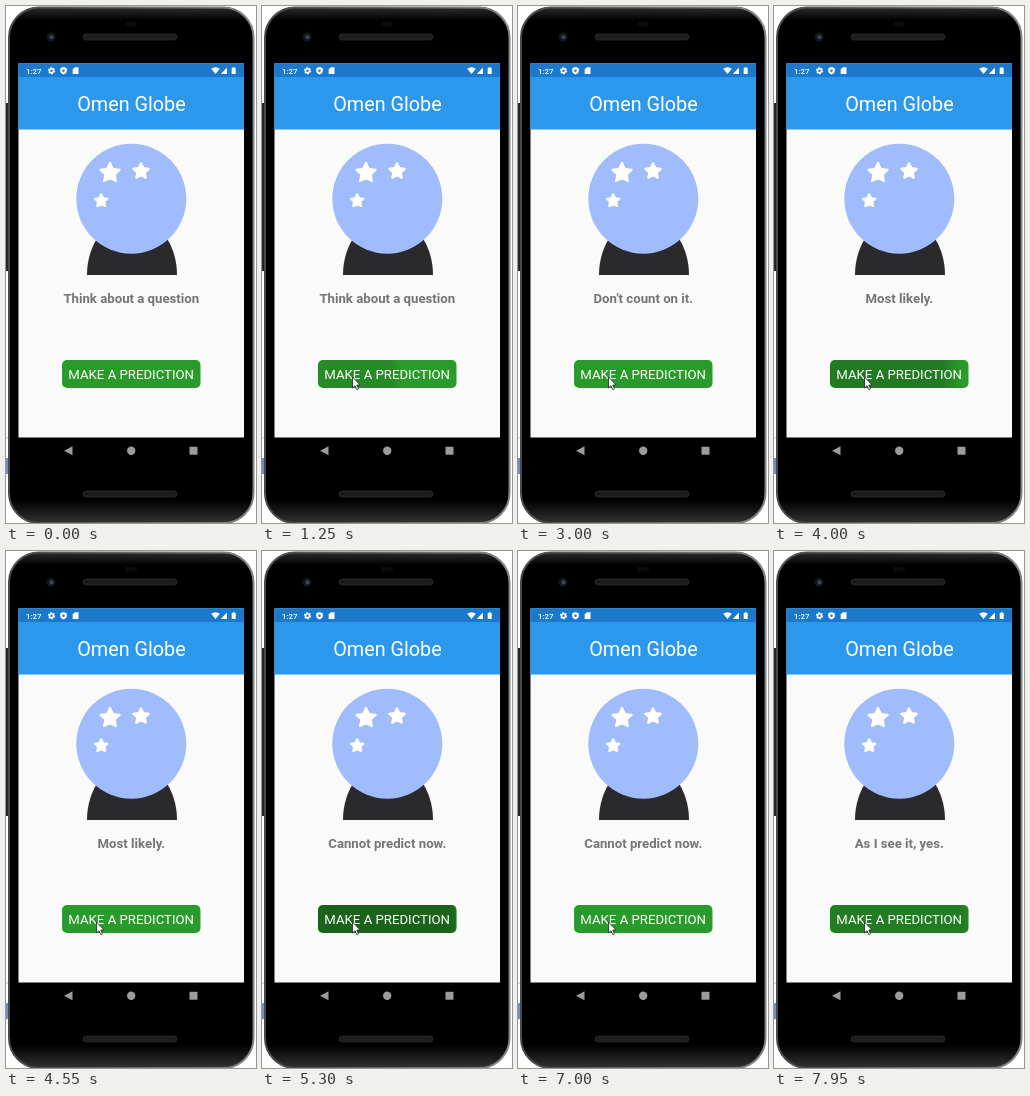
Recreate the animation shown at these times as an HTML page. Size 250 px wide and 517 px high, loop 8000 ms.

```html
<!DOCTYPE html>
<html lang="en">
<head>
<meta charset="utf-8">
<title>Omen Globe</title>
<style>
  html, body { margin: 0; width: 100%; height: 100%; overflow: hidden; background: #fff; }
  svg { display: block; width: 250px; height: 517px; }
  text { font-family: Roboto, sans-serif; text-anchor: middle; fill: #fff; }
</style>
</head>
<body>
<svg viewBox="0 0 250 517">
  <defs>
    <clipPath id="buttonShape"><rect x="56" y="354" width="138.5" height="28" rx="5"/></clipPath>
    <radialGradient id="rippleFill">
      <stop offset=".8" stop-color="#000"/>
      <stop offset="1" stop-color="#000" stop-opacity="0"/>
    </radialGradient>
    <linearGradient id="bodyFill" x2="0" y2="1">
      <stop stop-color="#2c2c2c"/>
      <stop offset=".025" stop-color="#000"/>
      <stop offset=".955" stop-color="#000"/>
      <stop offset="1" stop-color="#333"/>
    </linearGradient>
    <linearGradient id="rimFill">
      <stop stop-color="#4a4a4a"/>
      <stop offset="1" stop-color="#858585"/>
    </linearGradient>
  </defs>

  <!-- desktop behind the phone -->
  <rect width="250" height="517" fill="#fff"/>
  <path d="M0 97H5V265H0Z" fill="#252628"/>
  <path d="M0 432H6" stroke="#bbb"/>
  <path d="M0 452H5V468H0Z" fill="#6d8fc4"/>

  <!-- phone -->
  <rect x="3" y="1.500" width="244.500" height="515.500" rx="30" fill="url(#bodyFill)" stroke="url(#rimFill)" stroke-width="2"/>
  <rect x="119" y="15.500" width="12" height="5" rx="2" fill="#0b0b0b"/>
  <g fill="#1d1d1e" stroke="#303031" stroke-width=".7">
    <rect x="77" y="28" width="94" height="6" rx="3"/>
    <rect x="77" y="485" width="94" height="6" rx="3"/>
  </g>
  <circle cx="45" cy="31" r="4.500" fill="#15161a"/>
  <circle cx="45.500" cy="31.300" r="2" fill="#39476b"/>

  <!-- screen -->
  <rect x="12.500" y="58" width="225.500" height="400" fill="#000"/>
  <rect x="12.500" y="57.500" width="225.500" height="374" fill="#fafafa"/>
  <rect x="12.500" y="57.500" width="225.500" height="66" fill="#2b98ed"/>
  <rect x="12.500" y="57.500" width="225.500" height="13.500" fill="#1c78cd"/>

  <g fill="#fff">
    <text x="27.800" y="67.500" font-size="7.900" font-weight="500">1:27</text>
    <circle cx="45.500" cy="64.700" r="2" fill="none" stroke="#fff" stroke-width="1.600"/>
    <circle cx="45.500" cy="64.700" r="3" fill="none" stroke="#fff" stroke-width="1.200" stroke-dasharray="1.570"/>
    <path d="M57.500 61l3.300 1.300v2.400q0 2.600-3.300 3.700-3.300-1.100-3.300-3.700v-2.400z"/>
    <circle cx="57.500" cy="64.700" r="1.200" fill="#1c78cd"/>
    <path d="M68.800 61.300H72.500V68H66.700V63.400Z"/>
    <path d="M205.200 62.800q4.300-3.200 8.600 0L209.500 68Z"/>
    <path d="M221 61.500V68H214.800Z"/>
    <path d="M225.700 62h1v-.8h2v.8h1v6h-4z"/>
  </g>

  <text x="125.500" y="105" font-size="19.800">Omen Globe</text>

  <!-- globe -->
  <path d="M81 269A45 58 0 0 1 171 269Z" fill="#2a2a2c"/>
  <circle cx="125.300" cy="192.700" r="55" fill="#a1bcfc"/>
  <g id="stars" fill="#fff" stroke="#fff" stroke-width="2.200" stroke-linejoin="round"></g>

  <text id="answer" x="125.300" y="297.300" font-size="13.200" font-weight="700" style="fill:#757575"></text>

  <!-- button -->
  <g clip-path="url(#buttonShape)">
    <rect x="56" y="354" width="139" height="28" fill="#2a9a2a"/>
    <circle id="ripple" cx="92" cy="372" fill="url(#rippleFill)"/>
  </g>
  <text x="125.200" y="373.200" font-size="13.200">MAKE A PREDICTION</text>

  <!-- navigation bar -->
  <g fill="#9b9b9b">
    <path d="M66.500 440.300V449.300L58 444.800Z"/>
    <circle cx="125.200" cy="444.800" r="4.200"/>
    <rect x="183.500" y="440.800" width="8" height="8" rx=".6"/>
  </g>

  <path id="cursor" d="M0 0V11L2.500 8.700 4.200 12.600 6 11.800 4.300 8H7.700Z" fill="#fff" stroke="#222" stroke-width=".8"/>
</svg>

<script>
const LOOP = 8000;
const FIRST_TEXT = "Think about a question";
const presses = [
  [1150, "Outlook not so good."],
  [2270, "Don't count on it."],
  [3800, "Most likely."],
  [4950, "Cannot predict now."],
  [7440, "As I see it, yes."]
];
const TEXT_DELAY = 120, GROW = 250, DARKEN = 350, FADE = 350, DARKNESS = 0.36;

const get = id => document.getElementById(id);
const clamp = v => Math.min(1, Math.max(0, v));
const answer = get("answer"), ripple = get("ripple"), cursor = get("cursor");

function starPath(x, y, r) {
  const points = Array.from({ length: 10 }, (_, i) => {
    const a = i * Math.PI / 5 - Math.PI / 2;
    const d = i % 2 ? r * 0.48 : r;
    return `${(x + d * Math.cos(a)).toFixed(2)} ${(y + d * Math.sin(a)).toFixed(2)}`;
  });
  return `<path d="M${points.join("L")}Z"/>`;
}
get("stars").innerHTML =
  starPath(104, 167, 10) + starPath(135, 165.3, 8) + starPath(95.2, 194.8, 6.5);

function draw(t) {
  const shown = presses.filter(([at]) => t >= at + TEXT_DELAY).pop();
  const text = shown ? shown[1] : FIRST_TEXT;
  if (answer.textContent !== text) answer.textContent = text;

  const pressed = presses.filter(([at]) => t >= at).pop();
  const age = pressed ? t - pressed[0] : Infinity;
  const strength = clamp(age / DARKEN) * (1 - clamp((age - DARKEN) / FADE));
  ripple.setAttribute("r", 120 * clamp(age / GROW));
  ripple.setAttribute("opacity", DARKNESS * strength);

  const p = clamp((t - 500) / 550);
  const eased = 1 - (1 - p) ** 2;
  cursor.setAttribute("transform", `translate(${-10 + 100.5 * eased} ${470 - 99 * eased})`);
}

function tick() {
  draw(performance.now() % LOOP);
  requestAnimationFrame(tick);
}
tick();
</script>
</body>
</html>
```
